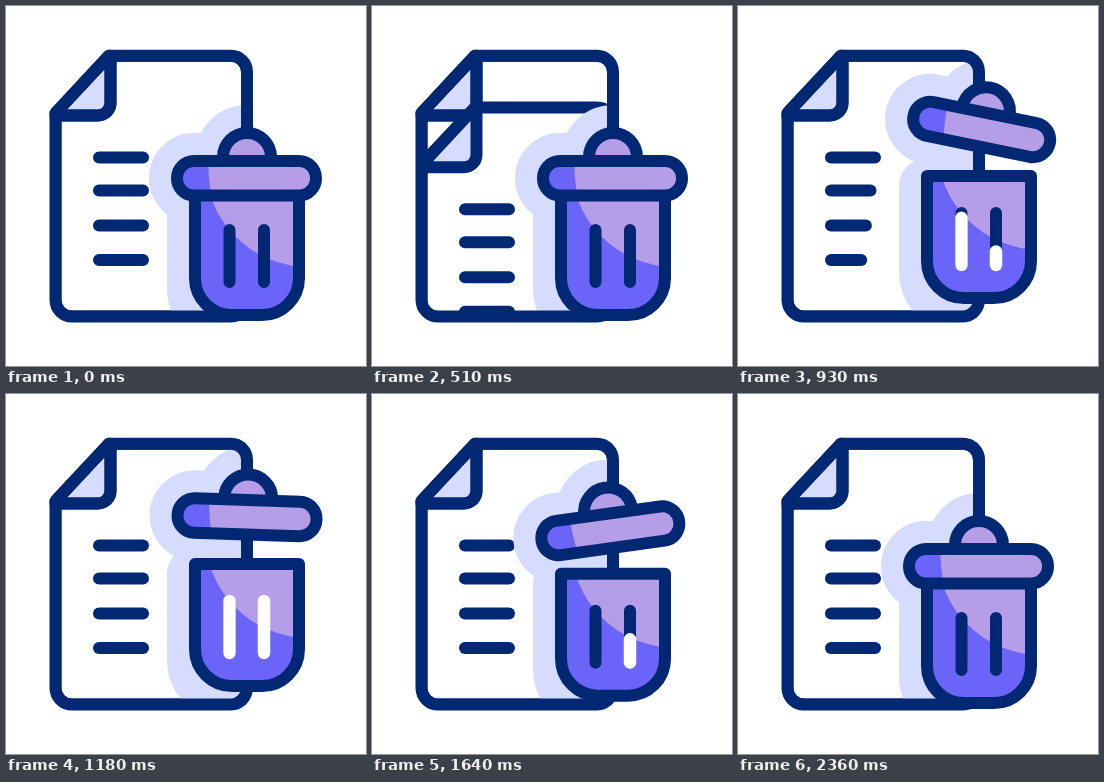
Recreate the animation shown at these times as an HTML page. Size 360 px wide and 360 px high, loop 2.4 s.

```html
<!DOCTYPE html>
<html lang="en">
<head>
<meta charset="utf-8">
<title>Delete document</title>
<style>
  html, body { margin: 0; height: 100%; overflow: hidden; background: #fff; }
  svg { display: block; width: 100vw; height: 100vh; }
  .ink { stroke: #022873; stroke-width: 12; stroke-linecap: round; stroke-linejoin: round; }
  .halo { fill: #d5dcfd; stroke: #d5dcfd; stroke-width: 56; stroke-linejoin: round; }
</style>
</head>
<body>
<svg viewBox="0 0 360 360" fill="none">
  <defs>
    <path id="page" d="M49.500 107 103 49.700H225a16 16 0 0 1 16 16V294a16.500 16.500 0 0 1-16 16.500H66a16.500 16.500 0 0 1-16.500-16.500Z"/>
    <path id="fold" d="M49.500 109.500H92a12.500 12.500 0 0 0 12.500-12.500V49.700H103L49.500 107Z"/>
    <path id="body" d="M189 187H293V272a37 37 0 0 1-37 37H226a37 37 0 0 1-37-37Z"/>
    <rect id="lid" x="171" y="155" width="139" height="34.5" rx="17"/>
    <path id="knob" d="M217 155V151a24 24 0 0 1 48 0V155Z"/>
    <clipPath id="inPage"><use href="#page"/></clipPath>
    <clipPath id="inBody"><use href="#body"/></clipPath>
    <clipPath id="inLid"><use href="#lid"/></clipPath>
  </defs>

  <g clip-path="url(#inPage)">
    <g class="ink">
      <use href="#page" fill="#fff"/>
      <use href="#fold" fill="#d5dcfd"/>
      <g id="newLines"></g>
      <g id="oldSheet">
        <use href="#page" fill="#fff"/>
        <use href="#fold" fill="#d5dcfd"/>
        <path d="M93 151.500H137M93 184.500H137M93 219.500H137M93 254H137"/>
      </g>
    </g>
    <g class="halo">
      <g data-part="body"><use href="#body" y="10"/></g>
      <g data-part="lid"><use href="#knob" data-part="knob"/><use href="#lid"/></g>
    </g>
  </g>
  <g class="ink"><use href="#page"/><use href="#fold"/></g>

  <g data-part="body">
    <g clip-path="url(#inBody)">
      <use href="#body" fill="#6b64f8"/>
      <circle cx="303" cy="157" r="104" fill="#b59de8"/>
    </g>
    <g class="ink">
      <use href="#body"/>
      <path d="M223.500 224V276M258 224V276"/>
      <g id="glow" stroke="#fff" stroke-width="12.5"></g>
    </g>
  </g>
  <g data-part="lid">
    <use href="#knob" class="ink" fill="#b59de8" data-part="knob"/>
    <g clip-path="url(#inLid)">
      <use href="#lid" fill="#b59de8"/>
      <path d="M165 150H202Q202 172 206 195H165Z" fill="#6b64f8"/>
    </g>
    <use href="#lid" class="ink"/>
  </g>
</svg>
<script>
  const LOOP = 2400;
  const byId = id => document.getElementById(id);
  const clamp = v => Math.min(1, Math.max(0, v));
  const ramp = (t, from, to) => clamp((t - from) / (to - from));
  const ease = (t, from, to) => {
    const u = ramp(t, from, to);
    return u * u * (3 - 2 * u);
  };
  const addPath = parent => parent.appendChild(
    document.createElementNS('http://www.w3.org/2000/svg', 'path'));
  const place = (part, transform) => document.querySelectorAll(`[data-part=${part}]`)
    .forEach(el => el.setAttribute('transform', transform));

  const textLines = [151.5, 184.5, 219.5, 254].map(y => ({ y, el: addPath(byId('newLines')) }));
  const glows = [[223.5, 650, 1330], [258, 850, 1470]]
    .map(([x, on, off]) => ({ x, on, off, el: addPath(byId('glow')) }));

  function draw(t) {
    byId('oldSheet').setAttribute('transform', `translate(0 ${269 * ease(t, 400, 795)})`);

    textLines.forEach(({ y, el }, i) => {
      const start = 550 + 40 * i, grown = ramp(t, start, start + 380);
      el.setAttribute('d', grown ? `M93 ${y}h${44 * grown}` : '');
    });

    glows.forEach(({ x, on, off, el }) => {
      const lit = ramp(t, on, on + 310) - ramp(t, off, off + 310);
      el.setAttribute('d', lit > 0 ? `M${x} 276v${-52 * lit}` : '');
    });

    const rise = ease(t, 550, 860) - ease(t, 1450, 1800);
    const open = ease(t, 550, 815) - ease(t, 1480, 1950);
    const tilt = 11.5 * ease(t, 540, 815) - 20.5 * ease(t, 980, 1400) + 9 * ease(t, 1520, 2080);
    place('body', `translate(0 ${-17 * rise})`);
    place('lid', `translate(0 ${-49 * open}) rotate(${tilt} 241 188)`);
    place('knob', `translate(0 ${2.5 * open})`);
  }

  function frame() {
    draw(performance.now() % LOOP);
    requestAnimationFrame(frame);
  }
  frame();
</script>
</body>
</html>
```
